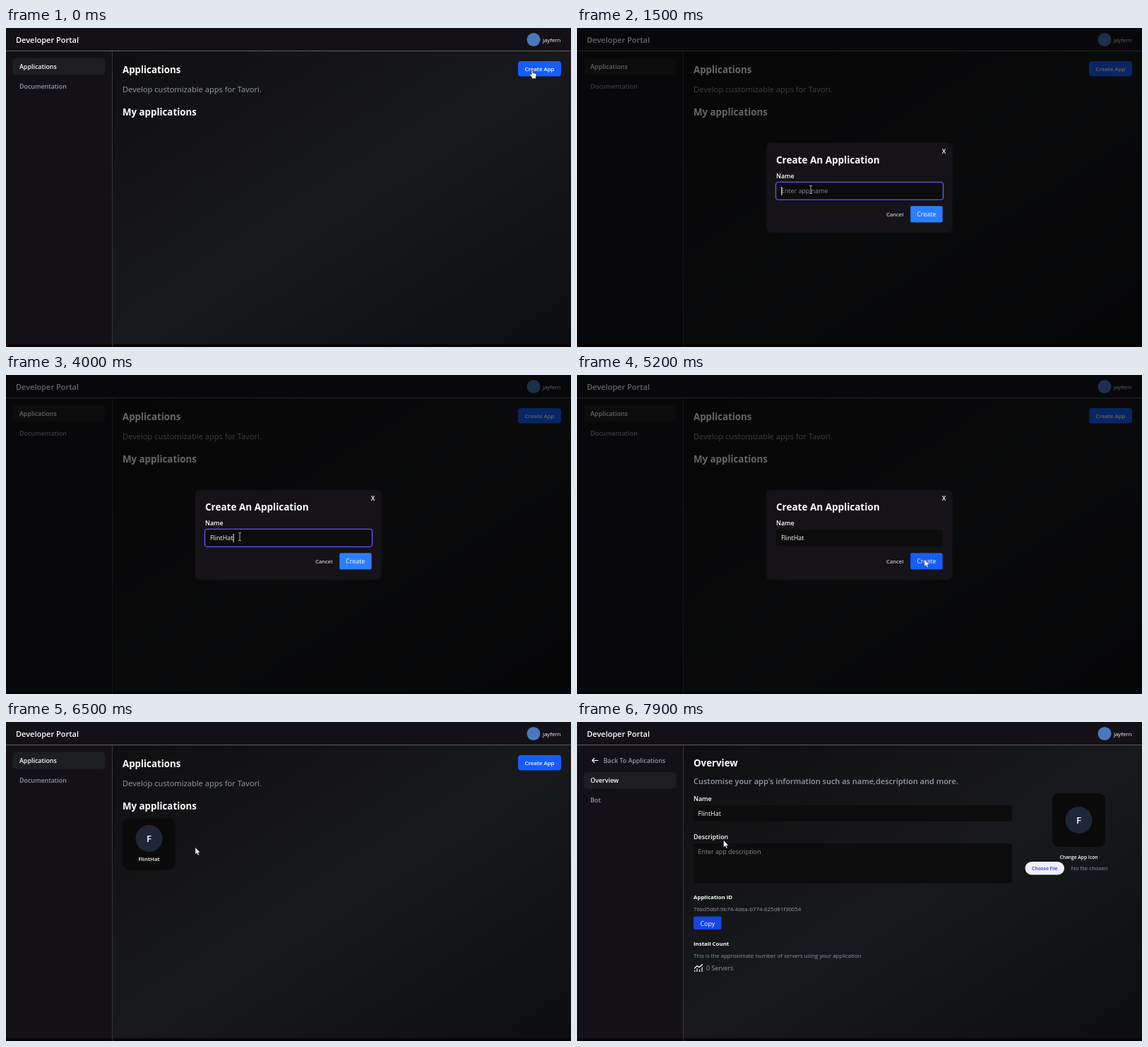
These frames come from a looping animation (800x452 px, 8 s). An HTML page:

```html
<!DOCTYPE html>
<html lang="en">
<head>
<meta charset="utf-8">
<title>Developer Portal</title>
<style>
  html, body { margin: 0; width: 100%; height: 100%; overflow: hidden; background: #0a0306; }
  svg { display: block; width: 800px; height: 452px; }
  text { font-family: "Open Sans", "Noto Sans", sans-serif; fill: #fff; white-space: pre; }
  .title { font-size: 13.3px; font-weight: 700; }
  .lead { font-size: 11.15px; }
  .body { font-size: 8.9px; }
  .small { font-size: 7.85px; }
  .tiny { font-size: 6.7px; }
  .semi { font-weight: 600; }
  .bold { font-weight: 700; }
  .gray { fill: #929aa6; }
  .hint { fill: #858a91; }
  .mid { text-anchor: middle; }
  .field { fill: #0c0c0d; }
  .line { fill: none; stroke: #fff; stroke-width: 1.2; stroke-linecap: round; stroke-linejoin: round; }
</style>
</head>
<body>
<svg viewBox="0 0 800 452">
  <defs>
    <linearGradient id="shade" gradientUnits="userSpaceOnUse" x1="287" y1="-55" x2="663" y2="535">
      <stop offset="0" stop-color="#0f0f11"/>
      <stop offset=".5" stop-color="#18191c"/>
      <stop offset="1" stop-color="#0d0e11"/>
    </linearGradient>
    <g id="initial">
      <circle r="19" fill="#1e2737"/>
      <text class="semi mid" y="5" font-size="13.3">F</text>
    </g>
  </defs>

  <rect width="800" height="448" fill="#131116"/>
  <rect x="150" y="33" width="650" height="415" fill="url(#shade)"/>
  <rect x="150" y="33" width="1" height="419" fill="#35363a"/>
  <rect y="32" width="800" height="1" fill="#5c5c60"/>
  <text class="semi" x="14" y="21" font-size="11">Developer Portal</text>
  <circle cx="747" cy="16.5" r="9.5" fill="#4a78bd"/>
  <text class="small" x="760" y="19.5">jayfern</text>

  <g id="home">
    <rect x="9.5" y="42.5" width="131" height="24" rx="5" fill="#1d1e21"/>
    <text class="body semi" x="19" y="57.7">Applications</text>
    <text class="body semi gray" x="19" y="86">Documentation</text>
    <text class="title" x="165" y="63.5">Applications</text>
    <text class="lead gray" x="165" y="90.5">Develop customizable apps for Tavori.</text>
    <text class="title" x="165" y="123.5">My applications</text>
    <rect x="725" y="47" width="61" height="21.5" rx="4" fill="#155dfc"/>
    <text class="small semi mid" x="755.5" y="60.8">Create App</text>
    <g id="card">
      <rect x="165" y="136.5" width="75" height="73" rx="9" fill="#0a0a0a"/>
      <use href="#initial" x="202.5" y="165"/>
      <text class="small semi mid" x="202.5" y="197">FlintHat</text>
    </g>
  </g>

  <g id="overview">
    <path class="line" d="M30 54.5H21.5M24.5 51.5L21.5 54.5L24.5 57.5"/>
    <text class="body semi gray" x="37.5" y="58">Back To Applications</text>
    <rect x="9.5" y="71" width="131" height="23.5" rx="5" fill="#1d1e21"/>
    <text class="body semi" x="19" y="86">Overview</text>
    <text class="body semi gray" x="19" y="114">Bot</text>
    <text class="title" x="165" y="62.5">Overview</text>
    <text class="semi gray" x="165" y="88" font-size="11">Customise your app's information such as name,description and more.</text>
    <text class="body semi" x="165" y="112">Name</text>
    <rect class="field" x="165" y="118" width="451" height="23" rx="4"/>
    <text class="body" x="171.5" y="133">FlintHat</text>
    <text class="body semi" x="165" y="166">Description</text>
    <rect class="field" x="165" y="172" width="451" height="56.5" rx="4"/>
    <text class="body hint" x="171.5" y="187">Enter app description</text>
    <text class="small bold" x="165" y="251.3">Application ID</text>
    <text class="small gray" x="165" y="268">76bd5dbf-9b74-4dea-b774-625d81f30054</text>
    <rect x="165" y="275.5" width="39.5" height="18.5" rx="2" fill="#1745e0"/>
    <text class="body mid" x="184.8" y="288.5">Copy</text>
    <text class="small bold" x="165" y="317.3">Install Count</text>
    <text class="small gray" x="165" y="334">This is the approximate number of servers using your application</text>
    <path class="line" d="M166.5 349L170 345.5L173 347.5L177.5 343.5M166.8 353.5V352M170 353.5V349.5M173.5 353.5V351M177 353.5V348"/>
    <text class="body gray" x="183" y="352.3">0 Servers</text>
    <rect x="673" y="101" width="75" height="76" rx="9" fill="#0a0a0a"/>
    <use href="#initial" x="710.5" y="139"/>
    <text class="tiny semi mid" x="710.5" y="193.5">Change App Icon</text>
    <rect x="634.5" y="198" width="55.5" height="18.5" rx="9.25" fill="#eef2ff"/>
    <text class="tiny semi mid" x="662.3" y="210" style="fill:#432dd7">Choose File</text>
    <text class="small gray" x="699.5" y="210">No file chosen</text>
  </g>

  <g id="modal">
    <rect width="800" height="452" opacity=".6"/>
    <rect x="268" y="162.7" width="263.7" height="127.3" rx="7" fill="#151317"/>
    <text class="body semi mid" x="519.5" y="178">X</text>
    <text class="title" x="282" y="192" style="font-size:13.5px">Create An Application</text>
    <text class="body semi" x="282" y="213">Name</text>
    <rect class="field" x="282" y="219.3" width="236" height="23.4" rx="4"/>
    <rect id="focus" x="281.5" y="218.4" width="237" height="25" rx="3.5" fill="none" stroke="#5f52fa" stroke-width="1.4"/>
    <text id="hint" class="body hint" x="289" y="234">Enter app name</text>
    <text id="entry" class="body" x="289" y="234"></text>
    <rect id="caret" y="225" width="1" height="12" fill="#fff"/>
    <text class="small" x="438" y="266.7">Cancel</text>
    <rect id="create" x="472.2" y="252.2" width="45.4" height="23.2" rx="2"/>
    <text class="body mid" x="494.8" y="267.2">Create</text>
  </g>

  <g id="cursor">
    <path id="arrow" d="M0 0V10L2.3 8L3.9 11.4L5.5 10.7L4 7.4H7Z" fill="#fff" stroke="#111" stroke-width=".5"/>
    <path id="hand" d="M-1 .8Q0-.4 1 .8V4.6L5.2 5.5Q6.2 5.8 6.1 7L5.3 10.5V12.8H-.3V11L-3.3 7.6Q-3.4 6-1.9 6.4L-1 7.2Z" fill="#fff" stroke="#111" stroke-width=".6"/>
    <path id="beam" d="M-2-5.5H-.6L0-5L.6-5.5H2M0-5V5M-2 5.5H-.6L0 5L.6 5.5H2" fill="none" stroke="#c4c4c4" stroke-width=".9"/>
  </g>
</svg>
<script>
const LOOP = 8000, STEP = 100, BLINK = 530;
const NAME = "FlintHat", TYPE_START = 2100, KEY_GAP = 200;
const OPEN = 200, FOCUS = 1400, BLUR = 5000, CLOSE = 5300, CARD = 5500, NEXT_PAGE = 7400;

// Pointer stops: time, x, y
const path = [
  [0, 745, 59], [700, 745, 59], [1300, 331, 229], [4050, 331, 229], [4500, 492, 261.5],
  [5400, 492, 261.5], [6300, 268, 177.5], [6500, 268, 177.5], [6800, 225, 201],
  [7000, 188, 188], [7200, 207.5, 167.5], [LOOP, 207.5, 167.5]
];

const el = id => document.getElementById(id);
const show = (id, on) => el(id).style.display = on ? "" : "none";
const inside = ([x, y], left, top, right, bottom) => x >= left && x <= right && y >= top && y <= bottom;

function pointer(t) {
  const i = path.findIndex(p => p[0] > t);
  const [t0, x0, y0] = path[i - 1], [t1, x1, y1] = path[i];
  const u = (t - t0) / (t1 - t0), k = u * u * (3 - 2 * u);
  return [x0 + (x1 - x0) * k, y0 + (y1 - y0) * k];
}

function draw(t) {
  const open = t >= OPEN && t < CLOSE, home = t < NEXT_PAGE;
  show("home", home);
  show("overview", !home);
  show("card", t >= CARD);
  show("modal", open);

  const typed = Math.max(0, Math.min(NAME.length, Math.floor((t - TYPE_START) / KEY_GAP) + 1));
  const lastKey = typed ? TYPE_START + (typed - 1) * KEY_GAP : FOCUS;
  const focused = t >= FOCUS && t < BLUR;
  el("entry").textContent = NAME.slice(0, typed);
  show("hint", !typed);
  show("focus", focused);
  show("caret", focused && Math.floor((t - lastKey) / BLINK) % 2 === 0);
  if (open) el("caret").setAttribute("x", 289.3 + (typed ? el("entry").getComputedTextLength() : 0));

  const at = pointer(t);
  el("create").setAttribute("fill", inside(at, 472, 252, 518, 275) ? "#155dfc" : "#2b7fff");
  const beam = open && inside(at, 282, 219, 518, 243);
  const hand = !open && home && (inside(at, 725, 47, 786, 69) || t >= CARD && inside(at, 165, 137, 240, 209));
  show("beam", beam);
  show("hand", hand);
  show("arrow", !beam && !hand);
  el("cursor").setAttribute("transform", `translate(${at})`);
}

const start = performance.now();
function frame() {
  const t = (performance.now() - start) % LOOP;
  draw(Math.floor(t / STEP) * STEP);
  requestAnimationFrame(frame);
}
frame();
</script>
</body>
</html>
```
